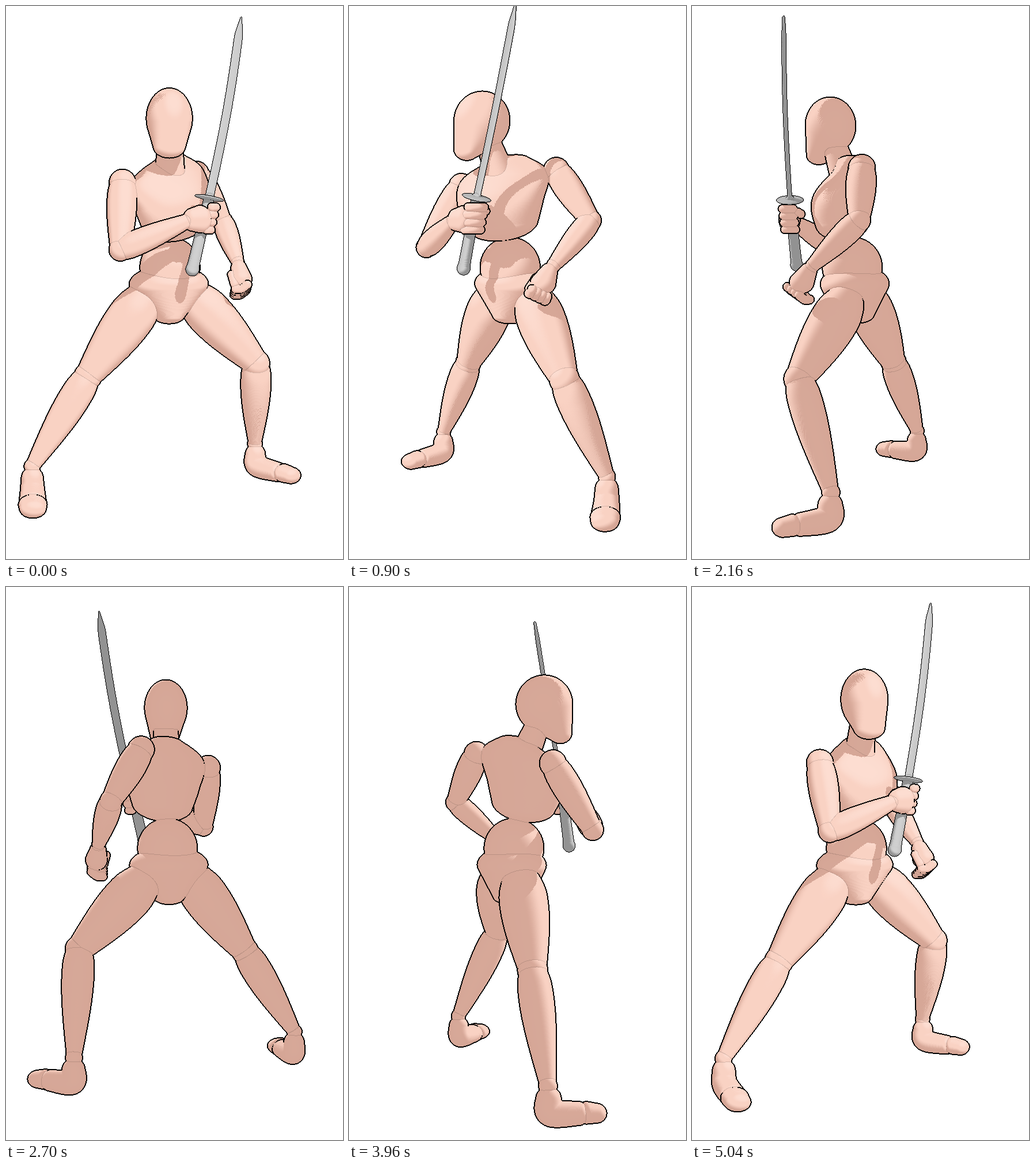
An HTML page with a canvas that plays this animation: 585x958 px, repeating every 5220 ms.

```html
<!DOCTYPE html>
<html lang="en">
<head>
<meta charset="utf-8">
<title>Mannequin turntable</title>
<style>
html, body { margin: 0; width: 100%; height: 100%; overflow: hidden; background: #fff; }
canvas { display: block; }
</style>
</head>
<body>
<canvas id="stage" width="585" height="958"></canvas>
<script>
const W = 585, H = 958, CX = 282, CY = 480;
const STEP_MS = 180, STEPS = 29, DISTANCE = 1400, PITCH = 0.07;
const ctx = document.getElementById("stage").getContext("2d");

const rad = degrees => degrees * Math.PI / 180;
const dot = (a, b) => a[0] * b[0] + a[1] * b[1] + a[2] * b[2];
const cross = (a, b) => [
  a[1] * b[2] - a[2] * b[1], a[2] * b[0] - a[0] * b[2], a[0] * b[1] - a[1] * b[0]
];
const add = (a, b) => a.map((v, i) => v + b[i]);
const sub = (a, b) => a.map((v, i) => v - b[i]);
const norm = a => a.map(v => v / Math.hypot(...a));
const mix = (a, b, t) => a.map((v, i) => v + (b[i] - v) * t);
const apply = (m, v) => m.map(row => dot(row, v));
const range = n => Array.from({ length: n }, (_, i) => i);
const smooth = (a, b, x) => {
  const t = Math.min(1, Math.max(0, (x - a) / (b - a)));
  return t * t * (3 - 2 * t);
};

function frame(yaw, up) {
  const u = norm(up), forward = [Math.sin(rad(yaw)), 0, Math.cos(rad(yaw))];
  const right = norm(cross(u, forward));
  return [right, u, cross(right, u)];
}

// A part is a chain of ellipsoids swept through knots: a place and its radii.
const blobs = [], metalIds = new Set();
let partId = 0;

function catmull(a, b, c, d, t) {
  return b.map((v, i) => v + 0.5 * t * (c[i] - a[i] +
    t * (2 * a[i] - 5 * v + 4 * c[i] - d[i] + t * (3 * (v - c[i]) + d[i] - a[i]))));
}

const knot = (place, r, ry = r, rz = r) => [...place, r, ry, rz];

function part(knots, yaw = 0, up = [0, 1, 0]) {
  const id = ++partId, axes = frame(yaw, up), last = knots.length - 1;
  const place = v => blobs.push({
    id, center: v.slice(0, 3),
    axes: axes.map((axis, i) => axis.map(c => c * v[3 + i]))
  });
  for (let i = 0; i < last; i++) {
    const from = knots[i], to = knots[i + 1];
    const n = Math.ceil(Math.hypot(...sub(to, from)) / 1.6);
    for (let j = 0; j < n; j++) {
      place(catmull(knots[Math.max(0, i - 1)], from, to, knots[Math.min(last, i + 2)], j / n));
    }
  }
  place(knots[last]);
  return id;
}
const metal = (...args) => metalIds.add(part(...args));
const ball = (p, r) => part([knot(p, r)]);

// Radius tapers from r0 to r1, with a muscle bulge nearer the upper end.
function limb(a, b, r0, r1, bulge) {
  part(range(9).map(i => {
    const t = i / 8;
    return knot(mix(a, b, t), r0 + (r1 - r0) * t + bulge * Math.sin(Math.PI * t ** 0.65));
  }));
}

function arm(shoulder, elbow, wrist) {
  ball(shoulder, 22);
  limb(shoulder, elbow, 18, 16, 7);
  ball(elbow, 18);
  limb(elbow, wrist, 17, 11, 5);
  ball(wrist, 11.5);
}

function leg(hip, knee, ankle, footYaw) {
  limb(hip, knee, 35, 22, 9);
  ball(knee, 24);
  limb(knee, ankle, 21, 12, 9);
  ball(ankle, 14);
  const forward = frame(footYaw, [0, 1, 0])[2];
  const at = (ahead, drop) => add(ankle, [forward[0] * ahead, -drop, forward[2] * ahead]);
  part([knot(at(1, 20), 19), knot(at(5, 41), 21), knot(at(48, 46), 23, 18, 14)], footYaw);
  part([knot(at(60, 46), 24, 17, 13), knot(at(75, 48), 22, 15, 16)], footYaw);
}

function torso() {
  part([knot([1, 275, 56], 38, 50, 49), knot([1, 226, 84], 26, 18, 20)]);
  part([knot([2, 190, 24], 25), knot([2, 238, 44], 21)]);
  const chestYaw = 45, axes = frame(chestYaw, [0, 1, 0]);
  const chest = (side, y, ahead) => add([0, y, 0],
    add(axes[0].map(v => v * side), axes[2].map(v => v * ahead)));
  part([
    knot(chest(-2, 210, 6), 34, 10, 24), knot(chest(-11, 180, 6), 80, 24, 38),
    knot(chest(-12, 140, 22), 76, 36, 52), knot(chest(-8, 103, 22), 62, 29, 46)
  ], chestYaw, [-0.1, 1, 0.1]);
  ball([2, 28, 4], 52);
  part([knot([0, -1, 0], 70, 32, 58), knot([0, -56, 2], 26, 14, 36)], 20);
}

function grippingHand(palm, handle) {
  part([knot(add(palm, [-14, -1, 8]), 14, 18, 13), knot(palm, 19, 22, 15)], -35);
  for (const k of range(4)) {
    part(range(5).map(j => {
      const a = rad(60 - 30 * j);
      return knot(add(handle,
        [15 * Math.cos(a) - 2.8 * k, 19 - 12 * k, 16 * Math.sin(a) + k]), 7);
    }));
  }
  part([knot(add(handle, [-17, 10, -7]), 8), knot(add(handle, [1, 13, -19]), 7)]);
}

function fist(palm) {
  part([knot(add(palm, [-3, 18, -12]), 14), knot(palm, 19, 18, 21)]);
  for (const k of range(4)) {
    part(range(3).map(j =>
      knot(add(palm, [9 - 10 * j, -8 - 4 * k - 9 * Math.sin(j), 24 - 9 * k - 2 * j]), 7.5)));
  }
  part([knot(add(palm, [-17, 8, 4]), 7), knot(add(palm, [-13, -8, 18]), 7)]);
}

function sword(pommel, guard, tip) {
  const axis = sub(tip, guard), yaw = 18;
  metal([knot(pommel, 10.5), knot(mix(pommel, guard, 0.15), 9), knot(guard, 8)]);
  metal([knot(guard, 23, 3, 23)], 0, axis);
  metal(range(13).map(i => {
    const t = i / 12, bow = 4 * Math.sin(Math.PI * t);
    const width = 6.8 - 6 * t ** 24;
    return knot(add(mix(guard, tip, t), [bow, 0, 0]), width, 4, 2);
  }), yaw, axis);
}

torso();
arm([-76, 170, 63], [-76, 62, 129], [32, 108, 120]);
arm([50, 193, -60], [100, 108, -98], [121, 36, -17]);
leg([-48, -34, 14], [-139, -158, 25], [-234, -311, 40], 10);
leg([52, -34, -20], [155, -143, -19], [162, -308, -95], 56);
grippingHand([50, 110, 110], [61, 110, 95]);
fist([125, 8, 4]);
sword([38, 30, 105], [65, 144, 93], [118, 436, 50]);

const makeBuffer = () => ({
  depth: new Float32Array(W * H), light: new Float32Array(W * H),
  facing: new Float32Array(W * H), id: new Uint8Array(W * H)
});

const LIGHT = norm([0.25, 0.6, 0.78]);
const lightRight = norm(cross([0, 1, 0], LIGHT));
const lightView = [lightRight, cross(LIGHT, lightRight), LIGHT];

function rasterize(view, distance, buf) {
  const { depth, light, facing, id } = buf;
  depth.fill(-1e5);
  id.fill(0);
  const [lx, ly, lz] = apply(view, LIGHT);
  for (const blob of blobs) {
    const p = apply(view, blob.center), s = distance / (distance - p[2]);
    const X = CX + p[0] * s, Y = CY - p[1] * s;
    let xx = 0, xy = 0, yy = 0, xz = 0, yz = 0, zz = 0;
    for (const axis of blob.axes) {
      const [u, v, w] = apply(view, axis).map(c => c * s);
      xx += u * u; xy += u * v; yy += v * v;
      xz += u * w; yz += v * w; zz += w * w;
    }
    const det = xx * yy - xy * xy, a = yy / det, b = -xy / det, c = xx / det;
    const kx = a * xz + b * yz, ky = b * xz + c * yz;
    const thick = Math.sqrt(Math.max(1e-4, zz - kx * xz - ky * yz));
    const rx = Math.sqrt(xx), ry = Math.sqrt(yy);
    const x0 = Math.max(0, Math.ceil(X - rx)), x1 = Math.min(W - 1, Math.floor(X + rx));
    const y0 = Math.max(0, Math.ceil(Y - ry)), y1 = Math.min(H - 1, Math.floor(Y + ry));
    for (let py = y0; py <= y1; py++) {
      const dy = Y - py;
      for (let px = x0; px <= x1; px++) {
        const dx = px - X, q = a * dx * dx + 2 * b * dx * dy + c * dy * dy;
        if (q >= 1) continue;
        const w = Math.sqrt(1 - q), i = py * W + px;
        const z = p[2] + (kx * dx + ky * dy + w * thick) / s;
        if (z <= depth[i]) continue;
        const gz = w / thick;
        const gx = a * dx + b * dy - kx * gz, gy = b * dx + c * dy - ky * gz;
        const len = Math.sqrt(gx * gx + gy * gy + gz * gz);
        depth[i] = z;
        id[i] = blob.id;
        light[i] = (gx * lx + gy * ly + gz * lz) / len;
        facing[i] = gz / len;
      }
    }
  }
}

const shadow = makeBuffer(), scene = makeBuffer();
rasterize(lightView, 1e9, shadow);

function inShadow(view, px, py, z) {
  const s = DISTANCE / (DISTANCE - z), vx = (px - CX) / s, vy = (CY - py) / s;
  const world = [0, 1, 2].map(i => view[0][i] * vx + view[1][i] * vy + view[2][i] * z);
  const [x, y, d] = apply(lightView, world);
  return shadow.depth[Math.round(CY - y) * W + Math.round(CX + x)] - d > 6;
}

const SHADE = [212, 164, 148], LIT = [249, 209, 194], SHINE = [255, 229, 219];
const STEEL_SHADE = [146, 146, 146], STEEL_LIT = [208, 208, 208];

function surfaceColor(id, light, facing, shaded) {
  const k = shaded ? 0 : smooth(0, 0.6, light);
  if (metalIds.has(id)) return mix(STEEL_SHADE, STEEL_LIT, k * (0.5 + 0.5 * facing));
  const base = mix(SHADE, LIT, k);
  return mix(base, SHINE, k * smooth(0.8, 1, light) * 0.55 + 0.06 * facing);
}

const image = ctx.createImageData(W, H);
const line = new Uint8Array(W * H);
const CREASE = 1, INK = 2;

function findLines({ depth, id }) {
  line.fill(0);
  const compare = (i, j) => {
    if (!id[i] && !id[j]) return;
    const gap = Math.abs(depth[i] - depth[j]), same = id[i] === id[j];
    const far = depth[i] < depth[j] ? i : j, near = i + j - far;
    if (gap > (same ? 25 : 6)) {
      line[far] = INK;
      if (!metalIds.has(id[near])) line[near] = INK;
    } else if (!same) {
      line[far] = Math.max(line[far], CREASE);
    }
  };
  for (let i = 0; i < W * (H - 1) - 1; i++) {
    compare(i, i + 1);
    compare(i, i + W);
  }
}

function draw(angle) {
  const sin = Math.sin(angle), cos = Math.cos(angle);
  const sp = Math.sin(PITCH), cp = Math.cos(PITCH);
  const view = [[cos, 0, -sin], [-sin * sp, cp, -cos * sp], [sin * cp, sp, cos * cp]];
  rasterize(view, DISTANCE, scene);
  findLines(scene);
  const data = image.data.fill(255);
  for (let i = 0; i < W * H; i++) {
    if (!scene.id[i] && !line[i]) continue;
    let color = [0, 0, 0];
    if (line[i] !== INK) {
      const shaded = inShadow(view, i % W, Math.floor(i / W), scene.depth[i]);
      color = surfaceColor(scene.id[i], scene.light[i], scene.facing[i], shaded);
      if (line[i] === CREASE) color = color.map(v => v * 0.87);
    }
    data[4 * i] = color[0];
    data[4 * i + 1] = color[1];
    data[4 * i + 2] = color[2];
  }
  ctx.putImageData(image, 0, 0);
}

// A full turn per loop whose speed drifts gently.
function turnAt(step) {
  const x = 2 * Math.PI * step / STEPS;
  return x - rad(6) * (1 - Math.cos(x)) + rad(7) * Math.sin(2 * x);
}

let shown = -1;
function tick() {
  const step = Math.floor(performance.now() / STEP_MS) % STEPS;
  if (step !== shown) {
    draw(turnAt(step));
    shown = step;
  }
  requestAnimationFrame(tick);
}
tick();
</script>
</body>
</html>
```
